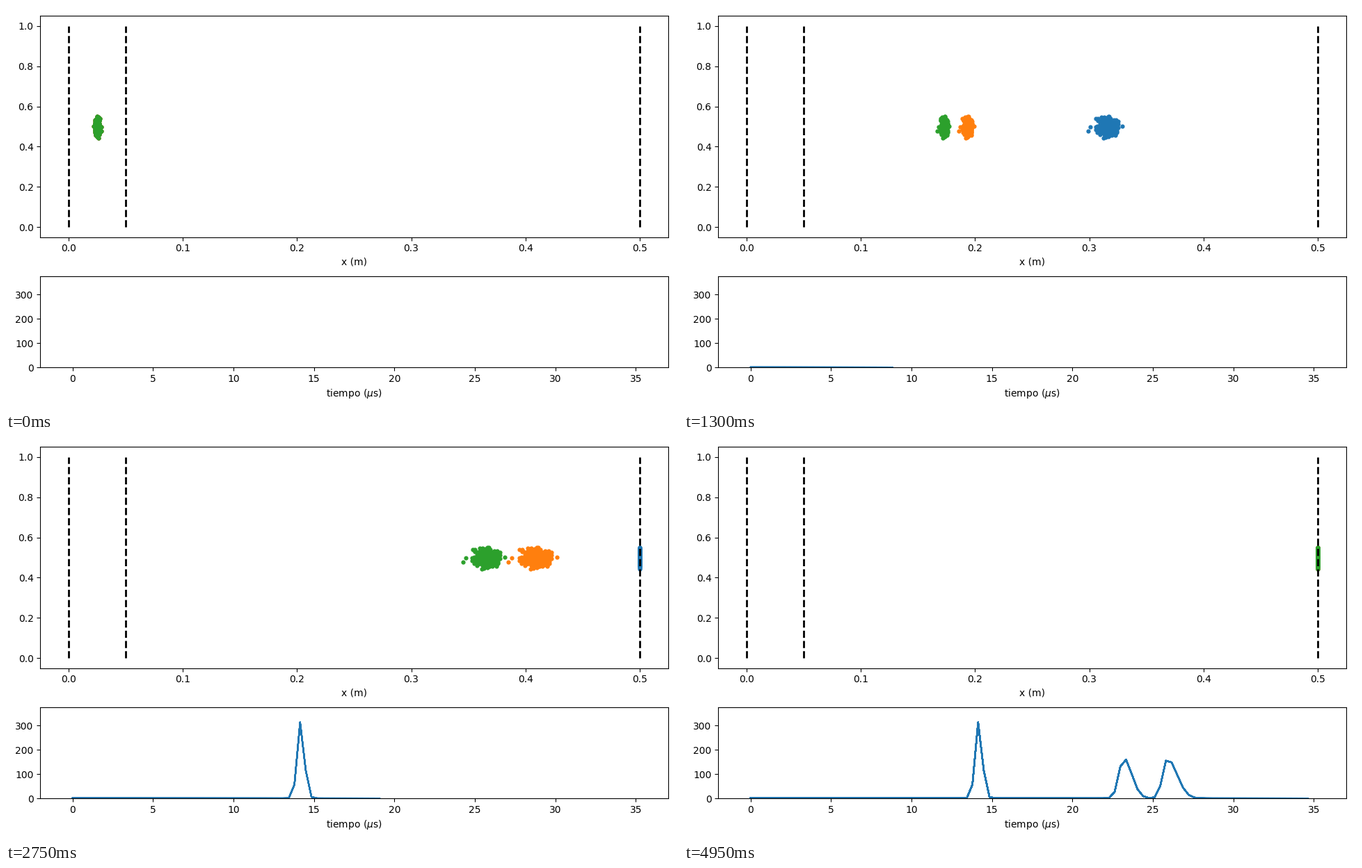
Recreate the animation shown at these times as a matplotlib script. Size 966 px wide and 580 px high, loop 5 s.

```python
import numpy as np
import matplotlib.pyplot as plt
from matplotlib.animation import FuncAnimation

WIDTH, HEIGHT = 966, 580
FRAMES = 100
N_IONS = 500
GATE, DETECTOR = 0.05, 0.5          # m
FORCE = 0.2834                      # acceleration * mass, m/us^2 * u
MASSES = {12: "C0", 32: "C1", 40: "C2"}

time = np.linspace(0, 35, FRAMES)   # us


def make_cloud():
    """Gaussian cloud in the middle of the gap, with a few stray ions."""
    rng = np.random.default_rng(7)
    pts = rng.normal(size=(2 * N_IONS, 2))
    inside = (np.abs(pts) < (2.4, 2.8)).all(axis=1)
    strays = [(3.7, -1.1), (3.3, 0.0), (-3.1, 0.1)]
    pts = np.vstack([pts[inside][:N_IONS - len(strays)], strays])
    return 0.025 + 0.001 * pts[:, 0], 0.5 + 0.02 * pts[:, 1]


def position(x0, mass, t):
    """Uniform acceleration up to the gate, then free drift to the detector."""
    acc = FORCE / mass
    gap = GATE - x0
    t_gate = np.sqrt(2 * gap / acc)
    drift = GATE + acc * t_gate * (t - t_gate)
    x = np.where(t < t_gate, x0 + acc * t**2 / 2, drift)
    return np.minimum(x, DETECTOR)


def peak(t, height, center, rise, fall):
    """Skewed bell: separate widths before and after the maximum."""
    width = np.where(t < center, rise, fall)
    return height * np.exp(-((t - center) / width) ** 2 / 2)


x0, y0 = make_cloud()
signal = (peak(time, 313, 14.14, 0.19, 0.25)
          + peak(time, 167, 23.18, 0.29, 0.50)
          + peak(time, 163, 25.90, 0.29, 0.60))

fig = plt.figure(figsize=(WIDTH / 100, HEIGHT / 100), dpi=100)
tube = plt.subplot2grid((3, 1), (0, 0), rowspan=2)
trace = plt.subplot2grid((3, 1), (2, 0))
fig.subplots_adjust(left=49.3 / WIDTH, right=951.7 / WIDTH,
                    top=1 - 14.4 / HEIGHT, bottom=60 / HEIGHT, hspace=0.431)

for x in (0, GATE, DETECTOR):
    tube.plot([x, x], [0, 1], "k--", lw=2)
clouds = {m: tube.scatter(x0, y0, s=12, color=c) for m, c in MASSES.items()}
tube.set(xlim=(-0.025, 0.525), ylim=(-0.05, 1.05), xlabel="x (m)")

# The trace is painted again at each step, so older parts look heavier
lines = [trace.plot(time[:k], signal[:k], "C0")[0] for k in range(FRAMES)]
trace.set(xlim=(-2, 37), ylim=(0, 0.75 * N_IONS), xlabel=r"tiempo ($\mu$s)",
          yticks=range(0, 301, 100))


def update(i):
    for mass, cloud in clouds.items():
        cloud.set_offsets(np.column_stack([position(x0, mass, time[i]), y0]))
    for k, line in enumerate(lines):
        line.set_visible(k <= i)
    return [*clouds.values(), *lines]


anim = FuncAnimation(fig, update, frames=FRAMES, interval=50,
                     init_func=lambda: update(0), repeat=True, repeat_delay=0)
plt.show()
```
